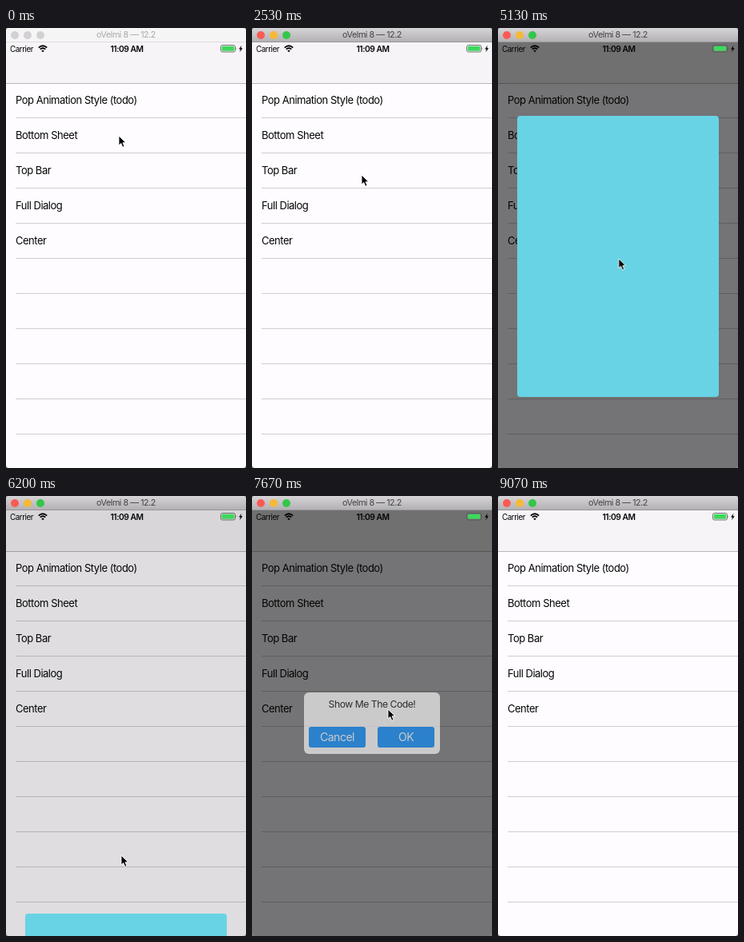
These frames come from a looping animation (300 px wide and 551 px high, 9.74 s). An HTML page:

```html
<!DOCTYPE html>
<html lang="en">
<head>
<meta charset="utf-8">
<title>Popup styles</title>
<style>
  html, body { margin: 0; width: 100%; height: 100%; overflow: hidden; background: #777; }
  body { font-family: Inter, Roboto, sans-serif; letter-spacing: -.03em; color: #050505; }
  div, svg, span { position: absolute; box-sizing: border-box; white-space: nowrap; }
  #stage { left: 0; top: 0; width: 300px; height: 551px; overflow: hidden; border-radius: 4px; background: #fefcff; }

  #bar { left: 0; top: 0; width: 300px; height: 18px; border-bottom: 1px solid #999799;
         background: linear-gradient(#d6d4d6, #b3b1b3); }
  #bar span, #idle span { left: 0; width: 300px; top: 2px; text-align: center; font-size: 10.8px; line-height: 14px; color: #444; }
  #idle { left: 0; top: 0; width: 300px; height: 18px; background: #f6f5f6; border-bottom: 1px solid #dedcde; }
  #idle span { color: #a9a7a9; }
  .light { top: 4px; width: 10px; height: 10px; border-radius: 50%; }

  #screen { left: 0; top: 18px; width: 300px; height: 533px; overflow: hidden; }
  #nav { left: 0; top: 0; width: 300px; height: 52px; background: #f6f4f7; border-bottom: 1px solid #b9b7ba; }
  .row { left: 12px; width: 288px; height: 44px; border-bottom: 1px solid #cfcdd0; font-size: 13px; line-height: 43px; }
  #dim { inset: 0; background: #000; opacity: 0; }

  #sheet { left: 16px; top: 213px; width: 268px; height: 330px; border-radius: 7px; background: #fff; }
  #sheet .msg { left: 0; width: 268px; top: 138px; text-align: center; font-size: 19px; font-weight: 600; line-height: 23px; }
  .btn { background: #008aff; color: #fff; text-align: center; border-radius: 4px; }
  #sheet .btn { left: 24px; top: 260px; width: 220px; height: 48px; font-size: 24px; font-weight: 500; line-height: 48px; }
  #top { left: 18px; top: 0; width: 264px; height: 250px; }
  #full { left: 24px; top: 92px; width: 252px; height: 352px; }
  #top, #full { background: #67d3e4; border-radius: 4px; }
  #center { left: 65px; top: 228px; width: 170px; height: 77px; border-radius: 6px; background: #fff; opacity: 0; }
  #center .msg { left: 0; width: 170px; top: 7px; text-align: center; font-size: 12.2px; line-height: 16px; }
  #center .btn { top: 43px; width: 71px; height: 26px; font-size: 14px; line-height: 26px; border-radius: 3px; }

  #status { left: 0; top: 18px; width: 300px; height: 16px; line-height: 16px; }
  #carrier { left: 5px; font-size: 9.9px; }
  #clock { left: 0; width: 302px; text-align: center; font-size: 10.3px; font-weight: 600; }
  #cursor { left: -1px; top: -1px; width: 12px; height: 18px; overflow: visible; }
</style>
</head>
<body>
<div id="stage">
  <div id="screen">
    <div id="nav"></div>
    <div id="list"></div>
    <div id="dim"></div>
    <div id="sheet">
      <svg style="left:245px;top:9px" width="14" height="14"><path d="M1 1 13 13M13 1 1 13" stroke="#000" stroke-width="1.4"/></svg>
      <div class="msg">Allow App to use<br>you Camera.</div>
      <div class="btn">Confirm</div>
    </div>
    <div id="top"></div>
    <div id="full"></div>
    <div id="center">
      <div class="msg">Show Me The Code!</div>
      <div class="btn" style="left:6px">Cancel</div>
      <div class="btn" style="left:92px">OK</div>
    </div>
  </div>
  <div id="status">
    <span id="carrier">Carrier</span>
    <svg style="left:40px;top:3px" width="12" height="10" fill="none" stroke="#000" stroke-width="1.8">
      <path d="M.8 3.6Q6 -1.2 11.2 3.6M2.7 5.7Q6 2.7 9.3 5.7"/>
      <path d="M6 9.3 4.2 7.4Q6 6 7.8 7.4Z" fill="#000" stroke="none"/>
    </svg>
    <span id="clock">11:09 AM</span>
    <svg style="left:267px;top:2px" width="32" height="12">
      <rect x="1.5" y="1.5" width="18" height="8.5" rx="2" fill="none" stroke="#555" stroke-width=".8"/>
      <rect x="2.7" y="2.7" width="15.6" height="6.1" rx="1" fill="#3fd75c"/>
      <path d="M20.6 4.2q1.3 1.5 0 3z" fill="#555"/>
      <path d="M27.6 1.8 24 6.5h2.1l-1 3.7 3.7-4.9h-2.2z" fill="#000"/>
    </svg>
  </div>
  <div id="bar"><span></span></div>
  <div id="idle"><span></span></div>
  <svg id="cursor" viewBox="-1 -1 12 18">
    <path d="M0 0V12L2.8 9.5 4.8 14.3 7 13.3 5 8.7H8.8Z" fill="#000" stroke="#fff" stroke-width=".9"/>
  </svg>
</div>
<script>
const LOOP = 9740;
const $ = id => document.getElementById(id);

function add(parent, cls, style, text = '') {
  const el = document.createElement('div');
  el.className = cls;
  el.textContent = text;
  Object.assign(el.style, style);
  parent.append(el);
}

const labels = ['Pop Animation Style (todo)', 'Bottom Sheet', 'Top Bar', 'Full Dialog', 'Center'];
for (let i = 0; i < 10; i++) add($('list'), 'row', { top: 51 + 44 * i + 'px' }, labels[i]);

const lights = { bar: ['#fc5a55', '#f5b935', '#32c748'], idle: ['#d2d0d2', '#d2d0d2', '#d2d0d2'] };
for (const id in lights) {
  $(id).querySelector('span').textContent = 'oVelmi 8 — 12.2';
  lights[id].forEach((background, i) => add($(id), 'light', { left: 6 + 16 * i + 'px', background }));
}

// Steps are [ms, value]; the first and last values hold to the ends of the loop.
function track(id, prop, steps, easing, format = v => v) {
  const all = [[0, steps[0][1]], ...steps, [LOOP, steps[steps.length - 1][1]]];
  const frames = all.map(([t, v]) => ({ offset: t / LOOP, [prop]: format(v), easing }));
  const anim = $(id).animate(frames, { duration: LOOP, iterations: Infinity });
  anim.startTime = start;
}
const start = document.timeline.currentTime || 0;
const shiftY = v => `translateY(${v}px)`;
const shift = ([x, y]) => `translate(${x}px, ${y}px)`;
const DIM = .54;

track('idle', 'opacity', [[0, 1], [70, 0]], 'step-end');
track('dim', 'opacity', [
  [130, 0], [430, DIM], [1870, DIM], [2170, 0],
  [4670, 0], [4970, DIM], [6000, DIM], [6300, 0],
  [7540, 0], [7670, DIM], [8560, DIM], [8860, 0]
], 'ease-in-out');
track('sheet', 'transform', [[130, 322], [530, 0], [1850, 0], [2200, 322]], 'ease-in-out', shiftY);
track('top', 'transform', [[2770, -252], [3130, 0], [3840, 0], [4170, -252]], 'ease-in-out', shiftY);
track('full', 'transform', [[4640, 534], [4970, 0], [6000, 0], [6300, 534]], 'ease-in-out', shiftY);
track('center', 'opacity', [[7540, 0], [7750, 1], [8560, 1], [8860, 0]], 'linear');
track('cursor', 'transform', [
  [0, [141, 135]], [640, [141, 135]], [1470, [265, 245]],
  [2000, [265, 245]], [2530, [137, 184]],
  [3340, [137, 184]], [3600, [180, 210]],
  [4000, [180, 210]], [4400, [152, 223]],
  [4870, [152, 223]], [5330, [150, 330]],
  [5480, [150, 330]], [5930, [144, 450]],
  [6480, [144, 450]], [7070, [139, 285]],
  [7210, [139, 285]], [7330, [170, 267]],
  [7750, [170, 267]], [8500, [190, 301]],
  [8640, [190, 301]], [9060, [312, 430]]
], 'ease-in-out', shift);
</script>
</body>
</html>
```
